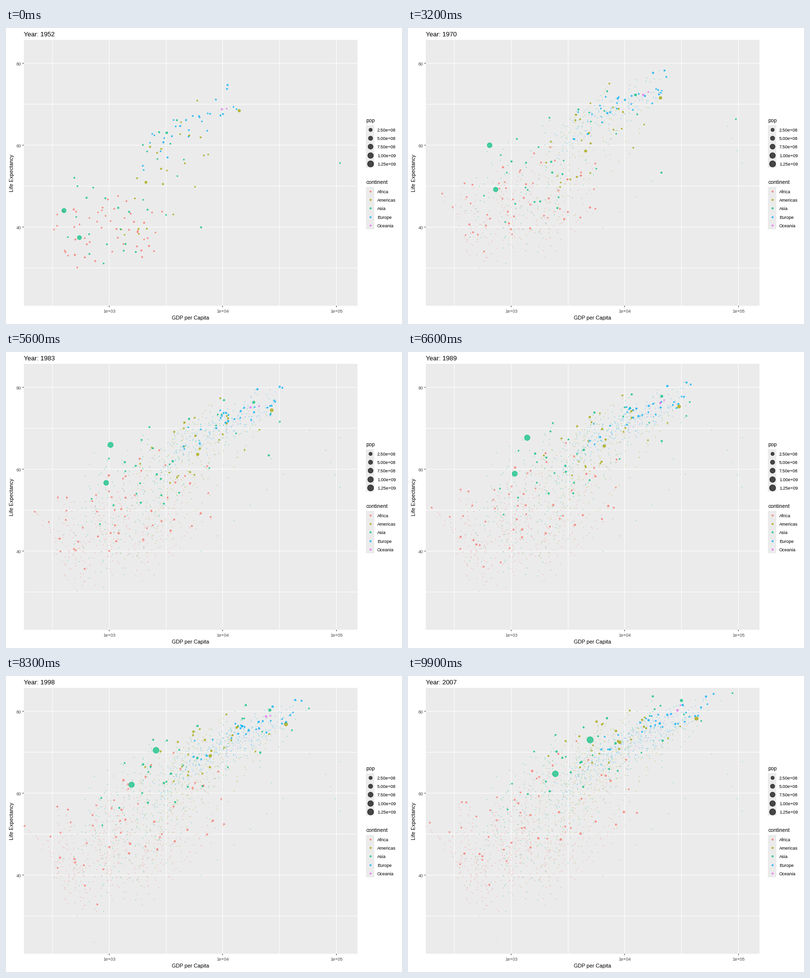
These frames come from a looping animation (800x600 px, 10000 ms). A matplotlib script:

```python
import matplotlib.pyplot as plt
from matplotlib.animation import FuncAnimation
from matplotlib.patches import Rectangle
import numpy as np

W, H, FRAMES, STEP = 800, 600, 100, 9
PT = 0.72  # points per pixel at 100 dpi
KEYS = np.arange(1952, 2008, 5)
GREY = "#EBEBEB"
COLORS = {"Africa": "#F8766D", "Americas": "#A3A500", "Asia": "#00BF7D",
          "Europe": "#00B0F6", "Oceania": "#E76BF3"}

# Per continent: number of countries, then at the start and at the end
# (log income, spread, life, spread, link between both), then easing powers
CLOUDS = {
    "Africa": (51, (2.99, .27, 39.2, 5, .35), (3.2, .42, 55, 9, .6), (.6, .65)),
    "Americas": (23, (3.5, .22, 53, 9, .65), (3.9, .26, 73.5, 4, .6), (.65, .78)),
    "Asia": (28, (3.14, .3, 46.5, 9, .4), (3.73, .55, 70.5, 7, .75), (.9, .8)),
    "Europe": (30, (3.7, .24, 64.6, 5, .87), (4.33, .25, 77.6, 3, .88), (.65, .72)),
    "Oceania": (2, (4.01, .01, 69.3, .1, .9), (4.47, .05, 80.7, .3, .9), (.9, 1.1)),
}

# The dots that stand out: continent, final population in millions,
# and stops as (year, income, life)
LEADERS = [
    ("Asia", 1319, [(1952, 400, 44), (1957, 576, 50.5), (1962, 488, 44.5),
                    (1967, 613, 58.4), (1977, 741, 64), (1992, 1656, 68.7),
                    (2007, 4959, 73)]),
    ("Asia", 1110, [(1952, 547, 37.4), (1967, 701, 47.2), (1977, 813, 54.2),
                    (1992, 1164, 60.2), (2007, 2452, 64.7)]),
    ("Asia", 127, [(1952, 3217, 63), (1972, 14779, 73.4), (2007, 31656, 82.6)]),
    ("Asia", 3, [(1952, 108382, 55.6), (1967, 80895, 64.6), (1972, 109348, 67.7),
                 (1982, 31354, 71.3), (2007, 47307, 77.6)]),
    ("Asia", 28, [(1952, 6460, 39.9), (1977, 34168, 58.7), (1987, 21198, 66.3),
                  (2007, 21655, 72.8)]),
    ("Americas", 301, [(1952, 13990, 68.4), (1967, 19530, 70.8),
                       (1977, 24073, 73.4), (2007, 42952, 78.2)]),
    ("Americas", 190, [(1952, 2109, 50.9), (1972, 4986, 59.5), (2007, 9066, 72.4)]),
    ("Africa", 9, [(1952, 493, 40), (1987, 848, 44), (1992, 737, 23.6),
                   (2007, 863, 46.2)]),
]

rng = np.random.default_rng(7)


def spread(n):
    """Evenly spaced scores of unit variance in random order."""
    return rng.permutation(np.linspace(-1.7, 1.7, n))


def cloud(n, start, end, powers):
    """Log income, life and population of n countries at every key year."""
    rich, gain, health = spread(n), spread(n), spread(n)

    def ends(spec, score):
        g, g_sd, life, life_sd, link = spec
        mix = link * score + np.sqrt(1 - link ** 2) * health
        return g + g_sd * score, life + life_sd * mix

    x0, y0 = ends(start, rich)
    x1, y1 = ends(end, .8 * rich + .6 * gain)
    t = ((KEYS - 1952) / 55)[:, None]
    x = x0 + (x1 - x0) * t ** powers[0] + rng.normal(0, .02, (12, n))
    y = y0 + (y1 - y0) * t ** powers[1] + rng.normal(0, .3, (12, n))
    return x, y, 10 ** (.9 + .45 * spread(n))


def path(pop, stops):
    year, income, life = np.array(stops).T
    x = np.interp(KEYS, year, np.log10(income))
    y = np.interp(KEYS, year, life)
    return x[:, None], y[:, None], np.array([pop])


def dot_size(millions):
    return 1 + 5 * np.sqrt(np.asarray(millions) / 1319)


def area(size):
    """Scatter area for a dot size in millimetres."""
    return ((.75 * (2.845 * np.asarray(size) + .945) - .8) * PT) ** 2


def px(log_income):
    return 208.4 + 229.25 * (log_income - 3)


def py(life):
    return 403.3 - 8.3 * (life - 40)


plt.rcParams["font.family"] = "Liberation Sans"
fig = plt.figure(figsize=(W / 100, H / 100), dpi=100, facecolor="white")
ax = fig.add_axes([0, 0, 1, 1])
ax.set(xlim=(0, W), ylim=(H, 0))
ax.axis("off")


def text(x, y, s, size, color="black", **kw):
    return ax.text(x, y, s, fontsize=size * PT, color=color, va="baseline", **kw)


def line(xs, ys, color):
    ax.plot(xs, ys, color=color, lw=PT, solid_capstyle="butt", snap=False, zorder=1)


def box(x, y, w, h):
    ax.add_patch(Rectangle((x, y), w, h, fc=GREY, ec="none", zorder=0))


def dots(x, y, size, color, alpha, z):
    return ax.scatter(x, y, s=area(size), c=color, edgecolors=color,
                      linewidths=PT, alpha=alpha, zorder=z)


# Panel, grid and axes
box(36, 24, 674, 539)
for k in range(6):
    x = int(93.7 + 114.7 * k) + .5
    y = 71.5 + 83 * k
    line([x, x], [24, 563], "white")
    line([36, 710], [y, y], "white")
    if k % 2:
        line([x, x], [563, 566], "#333333")
        text(x, 577, f"1e+0{3 + k // 2}", 9, "#4D4D4D", ha="center")
    elif k < 5:
        line([33, 36], [y, y], "#333333")
        text(31, y + 4, str(80 - 10 * k), 9, "#4D4D4D", ha="right")
text(372.5, 591, "GDP per Capita", 10.6, ha="center")
text(15, 294.5, "Life Expectancy", 10.6, ha="center", rotation=90,
     rotation_mode="anchor")
title = text(36, 17, "", 13)

# Legends
text(727, 191, "pop", 10.6)
box(727, 197, 17, 86)
text(727, 316, "continent", 10.6)
box(727, 322, 17, 86)
for k, (name, color) in enumerate(COLORS.items()):
    y, value = 205.7 + 17.28 * k, 250 * (k + 1)
    dots([735.6], [y], [dot_size(value)], "black", .7, 3)
    text(750, y + 4, f"{value * 1e6:.2e}", 9)
    dots([735.6], [y + 125], [1.5], color, .7, 3)
    text(750, y + 129, name, 9)

# Dots and their past positions
groups = [(name, cloud(*spec)) for name, spec in CLOUDS.items()]
groups += [(name, path(pop, stops)) for name, pop, stops in LEADERS]
colors = [COLORS[name] for name, g in groups for _ in g[2]]
count = len(colors)
xs = px(np.hstack([g[0] for _, g in groups]))
ys = py(np.hstack([g[1] for _, g in groups]))
people = np.hstack([g[2] for _, g in groups])
sizes = dot_size(people * np.exp(.0165 * (KEYS - 2007))[:, None])
marks = np.column_stack([xs.ravel(), ys.ravel()])

past = dots(marks[:, 0], marks[:, 1], np.full(len(marks), .5), colors * 12, .3, 3)
live = dots(xs[0], ys[0], sizes[0], colors, .7, 4)


def update(i):
    k = min(i // STEP, 10)
    f = i / STEP - k
    x, y, s = (v[k] + (v[k + 1] - v[k]) * f for v in (xs, ys, sizes))
    live.set_offsets(np.column_stack([x, y]))
    live.set_sizes(area(s))
    seen = -(-i // STEP)
    past.set_offsets(marks[:seen * count])
    title.set_text(f"Year: {round(1952 + 5 * i / STEP)}")
    return past, live, title


anim = FuncAnimation(fig, update, frames=FRAMES, interval=100, repeat=True,
                     repeat_delay=0, blit=False)
plt.show()
```
